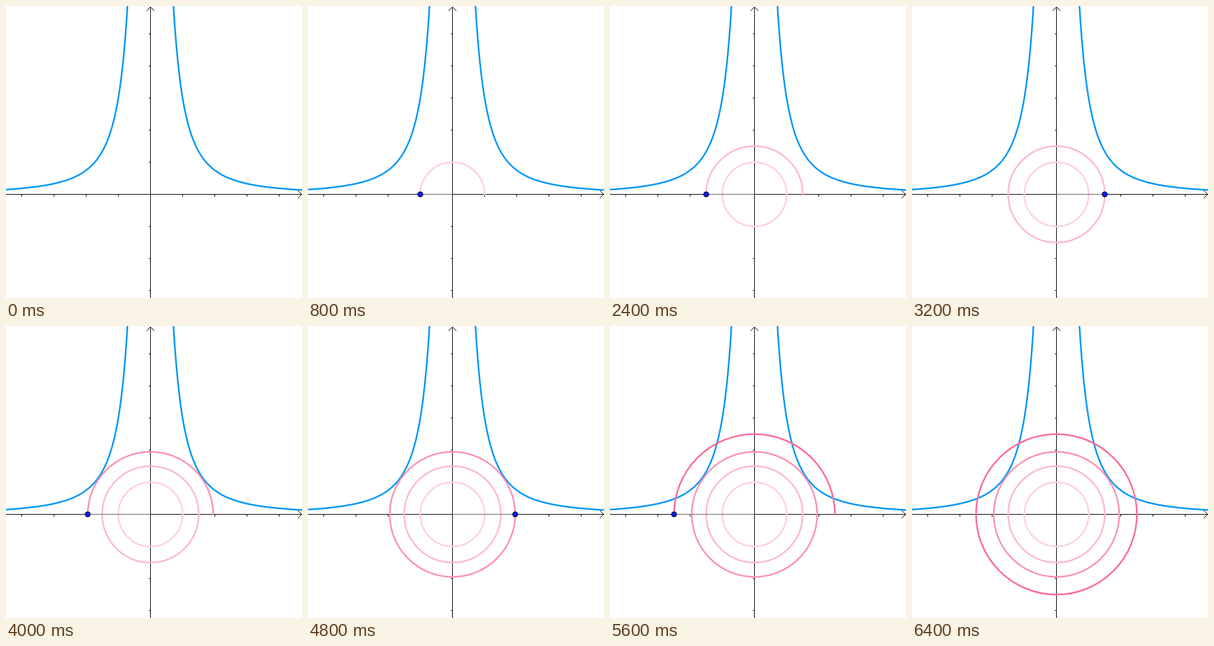
An HTML page that plays this animation: 460x455 px, repeating every 6600 ms.

```html
<!DOCTYPE html>
<html lang="en">
<head>
<meta charset="utf-8">
<title>Growing circles under a curve</title>
<style>
  html, body { margin: 0; width: 100%; height: 100%; overflow: hidden; background: #fff; }
  svg { display: block; width: 460px; height: 455px; }
  path, circle, line { fill: none; }
  #axes { stroke: #000; shape-rendering: crispEdges; }
  #heads { stroke: #000; }
  #curve { stroke: #0096f8; stroke-width: 2.5; }
  #rings circle { stroke-width: 2.5; stroke-linecap: round; }
  #arm line { stroke: #888; stroke-width: 1.6; }
  #arm circle { fill: #0a1ef0; stroke: #000; }
</style>
</head>
<body>
<svg viewBox="0 0 460 455">
  <path id="axes"/>
  <path id="heads" d="M218.5 7.5L224.5 1.5L230.5 7.5M453.5 287.5L459.5 293.5L453.5 299.5"/>
  <g transform="translate(224.5 293.5)">
    <path id="curve"/>
    <g id="rings"></g>
    <g id="arm"><line/><circle r="4"/></g>
  </g>
</svg>
<script>
  const $ = s => document.querySelector(s);
  const UNIT = 50, CX = 224.5, CY = 293.5;
  const STEP = 200, FRAMES = 33, PER_RING = 8;
  const rings = [
    { r: 50, color: '#fdd0e0' },
    { r: 75, color: '#fcb7da' },
    { r: 97.5, color: '#fd8fb4' },
    { r: 125, color: '#fd6b91' }
  ];

  // Axes with a tick at every unit
  let axes = `M0 ${CY}H460M${CX} 2V455`;
  for (let i = -4; i <= 5; i++) {
    if (i && i < 5) axes += `M${CX + i * UNIT} ${CY}v3`;
    if (i && i > -4) axes += `M${CX} ${CY - i * UNIT}h-3`;
  }
  $('#axes').setAttribute('d', axes);

  // Both branches of y = 3 / x²
  const branch = side => {
    const pts = [];
    for (let x = 0.69; x < 4.8; x += 0.02) {
      pts.push(`${(side * x * UNIT).toFixed(2)} ${(-3 / (x * x) * UNIT).toFixed(2)}`);
    }
    return 'M' + pts.join('L');
  };
  $('#curve').setAttribute('d', branch(-1) + branch(1));

  for (const ring of rings) {
    ring.el = document.createElementNS('http://www.w3.org/2000/svg', 'circle');
    ring.el.setAttribute('r', ring.r);
    ring.el.setAttribute('stroke', ring.color);
    ring.el.setAttribute('pathLength', PER_RING);
    ring.el.setAttribute('transform', 'scale(1 -1)');
    $('#rings').append(ring.el);
  }

  const arm = $('#arm'), spoke = $('#arm line'), dot = $('#arm circle');

  function draw(now) {
    const frame = Math.floor(now / STEP) % FRAMES;
    rings.forEach(({ el }, i) => {
      const part = Math.min(PER_RING, frame - i * PER_RING);
      el.style.display = part > 0 ? '' : 'none';
      el.setAttribute('stroke-dasharray', part < PER_RING ? `${Math.max(0, part)} ${PER_RING * 2}` : 'none');
    });

    const moving = frame > 0 && frame < FRAMES - 1;
    arm.style.display = moving ? '' : 'none';
    if (moving) {
      const { r } = rings[Math.floor((frame - 1) / PER_RING)];
      arm.setAttribute('transform', `rotate(${-frame * 360 / PER_RING})`);
      spoke.setAttribute('x2', r);
      dot.setAttribute('cx', r);
    }
    requestAnimationFrame(draw);
  }
  draw(performance.now());
</script>
</body>
</html>
```
